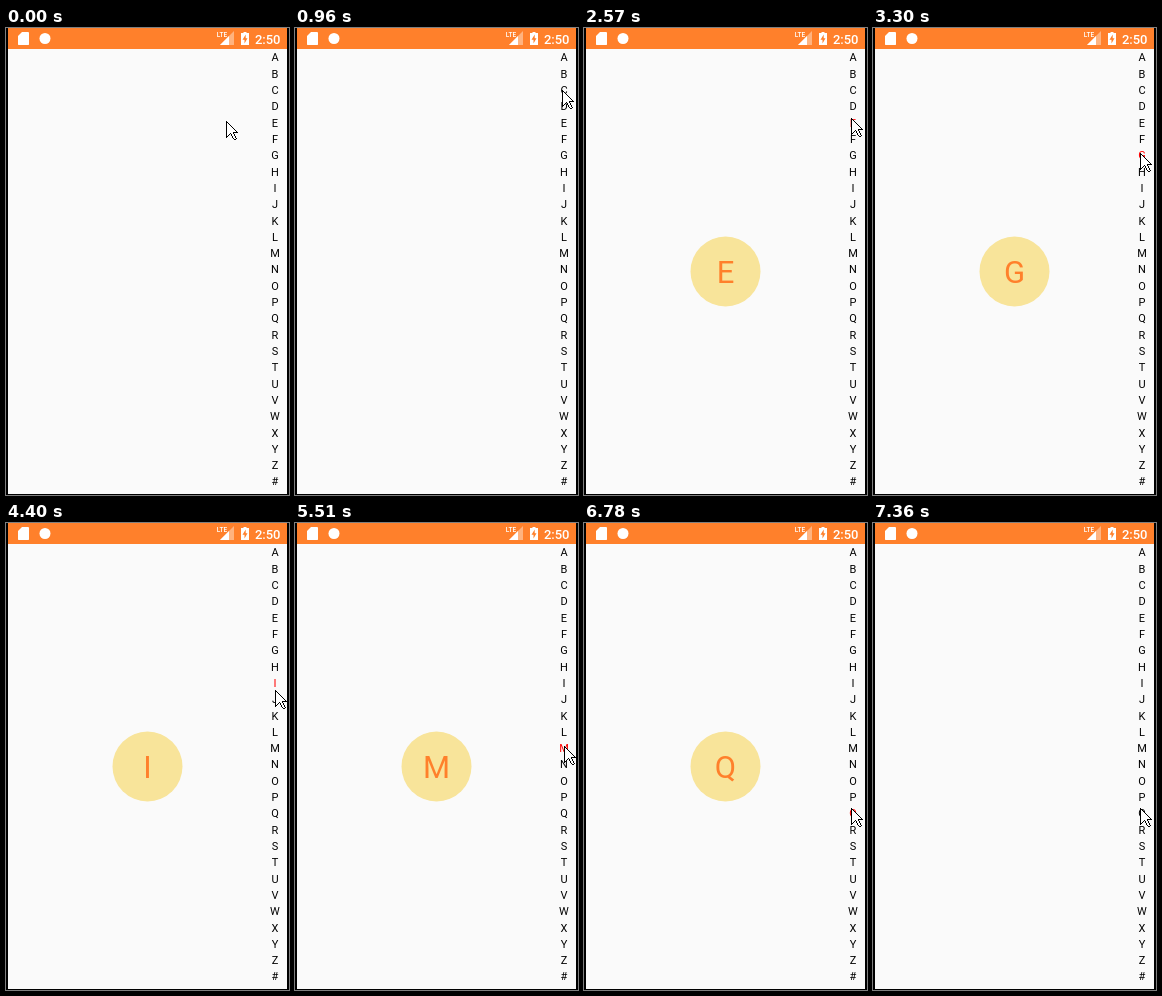
An HTML page with a canvas for the animation above (8000 ms loop, 283 by 467 pixels).

```html
<!DOCTYPE html>
<html lang="en">
<head>
<meta charset="utf-8">
<title>Alphabet side bar</title>
<style>
html, body { margin: 0; width: 100%; height: 100%; overflow: hidden; background: #000; }
canvas { display: block; width: 283px; height: 467px; }
</style>
</head>
<body>
<canvas id="stage"></canvas>
<script>
const W = 283, H = 467, LOOP = 8000;
const LETTERS = 'ABCDEFGHIJKLMNOPQRSTUVWXYZ#';
const ROW = 16.31, TOP = 21.3;
const ORANGE = '#ff802b', PAPER = '#fafafa';
const PRESS = 1360, RELEASE = 7360;
const FONT = 'Roboto, "Open Sans", sans-serif';

// The pointer is sampled on a steady beat between a few key points: time, x, y
const BEAT = 137.4, PHASE = 133;
const KEYS = [
  [0, 220, 93],
  [957, 267, 62],
  [1782, 267, 62],
  [1919, 267, 66],
  [3293, 267, 125],
  [4392, 269, 167],
  [5079, 269, 199],
  [5491, 269, 223],
  [6178, 269, 263],
  [6728, 267, 285]
];

const canvas = document.getElementById('stage');
const ctx = canvas.getContext('2d');
const ratio = window.devicePixelRatio || 1;
canvas.width = Math.round(W * ratio);
canvas.height = Math.round(H * ratio);

function pointerAt(t) {
  const beat = PHASE + Math.floor((t - PHASE) / BEAT) * BEAT;
  const next = KEYS.findIndex(key => key[0] > beat);
  if (next < 0) return KEYS[KEYS.length - 1].slice(1);
  if (next === 0) return KEYS[0].slice(1);
  const [t0, x0, y0] = KEYS[next - 1];
  const [t1, x1, y1] = KEYS[next];
  const p = (beat - t0) / (t1 - t0);
  return [Math.round(x0 + (x1 - x0) * p), Math.round(y0 + (y1 - y0) * p)];
}

function rect(x, y, w, h, color) {
  ctx.fillStyle = color;
  ctx.fillRect(x, y, w, h);
}

function poly(points, color) {
  ctx.beginPath();
  points.forEach(([x, y]) => ctx.lineTo(x, y));
  ctx.closePath();
  ctx.fillStyle = color;
  ctx.fill();
}

function disc(x, y, r, color) {
  ctx.beginPath();
  ctx.arc(x, y, r, 0, Math.PI * 2);
  ctx.fillStyle = color;
  ctx.fill();
}

function text(str, x, y, size, color, weight = 400) {
  ctx.font = `${weight} ${size}px ${FONT}`;
  ctx.textAlign = 'center';
  ctx.fillStyle = color;
  ctx.fillText(str, x, y);
}

function drawStatusBar() {
  rect(2, 0, 279, 21, ORANGE);

  // Memory card
  poly([[16, 4], [22.5, 4], [23, 4.5], [23, 16.5], [22.5, 17], [12.5, 17], [12, 16.5], [12, 8]], '#fff');

  disc(39, 10.5, 5.5, '#fff');

  // Signal
  poly([[214, 17], [228, 17], [228, 3]], 'rgba(255,255,255,.4)');
  poly([[214, 17], [223, 17], [223, 8]], '#fff');
  text('LTE', 216, 9.3, 6.5, '#fff', 500);

  // Battery
  rect(237.5, 4, 3, 2, '#fff');
  rect(235, 5, 8, 12, '#fff');
  poly([[239.7, 6.5], [236.5, 11.7], [238.5, 11.7], [238.5, 15.5], [241.5, 10.3], [239.7, 10.3]], ORANGE);

  text('2:50', 261.7, 15.6, 13, '#fff', 500);
}

// One pixel row of the pointer: black ends, white between
function span(x, y, w) {
  rect(x, y, w, 1, '#000');
  if (w > 2) rect(x + 1, y, w - 2, 1, '#fff');
}

function drawPointer(x, y) {
  for (let i = 0; i < 17; i++) span(x, y + i, i < 11 ? i + 1 : 17 - i);
  for (let i = 12; i < 18; i++) span(x + 4 + Math.floor((i - 11) / 2), y + i, 4);
  rect(x, y + 11, 12, 1, '#000');
  rect(x + 1, y + 11, 6, 1, '#fff');
  rect(x + 8, y + 18, 2, 1, '#000');
}

function draw(t) {
  ctx.setTransform(canvas.width / W, 0, 0, canvas.height / H, 0, 0);
  rect(0, 0, W, H, '#000');
  rect(2, 0, 279, 466, PAPER);
  drawStatusBar();

  const [x, y] = pointerAt(t);
  const pressed = t >= PRESS && t < RELEASE;
  const active = pressed ? Math.floor((y - TOP) / ROW) : -1;

  [...LETTERS].forEach((ch, i) => {
    text(ch, 269, 33.4 + i * ROW, 11, i === active ? '#f00' : '#000');
  });

  if (pressed) {
    disc(141.5, 243.5, 35, '#f8e49a');
    text(LETTERS[active], 141.5, 255, 31, ORANGE);
  }
  drawPointer(x, y);
}

function loop() {
  draw(performance.now() % LOOP);
  requestAnimationFrame(loop);
}
loop();
</script>
</body>
</html>
```
